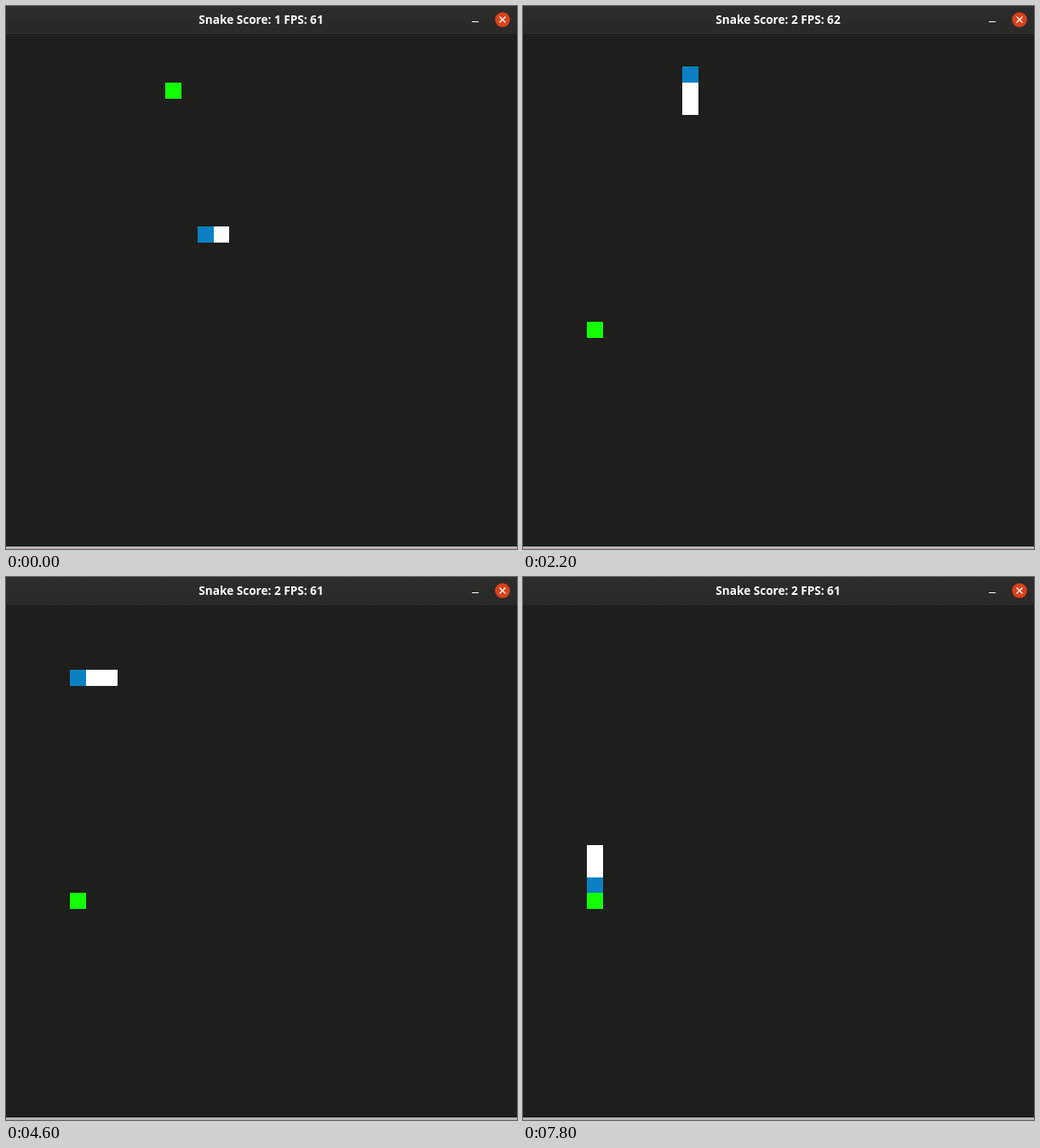
Animation of 600 by 638 pixels, one loop 8000 ms. Source, as an HTML page with a canvas:

```html
<!DOCTYPE html>
<html lang="en">
<head>
<meta charset="utf-8">
<title>Snake</title>
<style>
  html, body { margin: 0; width: 100%; height: 100%; overflow: hidden; background: #1e1e1c; }
  canvas { display: block; width: 600px; height: 638px; }
</style>
</head>
<body>
<canvas id="stage" width="600" height="638"></canvas>
<script>
const ctx = document.getElementById('stage').getContext('2d');

const LOOP = 8000, TICK = 200;
const CELL = 600 / 32, TOP = 34;
const MOVES_PER_MS = 0.006565, MOVE_PHASE = 0.49;
const EAT_MOVE = 13;
const DIRS = { L: [-1, 0], R: [1, 0], U: [0, -1], D: [0, 1] };

// Each pair is a direction and a number of cells.
const ROUTE = 'L1 U7 L2 U1 R1 U2 R4 D2 L11 D6 R2 D1 L3 D2 R2 D5';

function buildTrail() {
  let x = 13, y = 12;
  const trail = [[x, y], [--x, y]];
  for (const leg of ROUTE.split(' ')) {
    const [dx, dy] = DIRS[leg[0]];
    for (let i = 0; i < +leg.slice(1); i++) trail.push([x += dx, y += dy]);
  }
  return trail;
}
const trail = buildTrail();

function drawCell([col, row], color) {
  const snap = v => Math.round(v - 0.01);
  const x = snap(col * CELL), y = snap(TOP + row * CELL);
  ctx.fillStyle = color;
  ctx.fillRect(x, y, snap((col + 1) * CELL) - x, snap(TOP + (row + 1) * CELL) - y);
}

function drawWindow(title) {
  ctx.fillStyle = '#1e1e1c';
  ctx.fillRect(0, 0, 600, 638);

  const bar = ctx.createLinearGradient(0, 0, 0, TOP);
  bar.addColorStop(0, '#2d2d2c');
  bar.addColorStop(1, '#292928');
  ctx.fillStyle = bar;
  ctx.fillRect(0, 0, 600, TOP - 1);
  ctx.fillStyle = '#b9b6b2';
  ctx.fillRect(0, 635, 600, 3);

  ctx.fillStyle = '#fff';
  ctx.font = 'bold 13.6px "Open Sans", "Noto Sans", sans-serif';
  ctx.textAlign = 'center';
  ctx.textBaseline = 'alphabetic';
  ctx.fillText(title, 299.5, 21);
  ctx.fillRect(547, 18, 8, 1);

  ctx.fillStyle = '#d9411b';
  ctx.beginPath();
  ctx.arc(583, 16, 8.8, 0, Math.PI * 2);
  ctx.fill();
  ctx.strokeStyle = '#fff';
  ctx.lineWidth = 1.4;
  ctx.beginPath();
  ctx.moveTo(579.5, 12.5);
  ctx.lineTo(586.5, 19.5);
  ctx.moveTo(586.5, 12.5);
  ctx.lineTo(579.5, 19.5);
  ctx.stroke();
}

function draw(now) {
  const t = Math.floor((now % LOOP) / TICK) * TICK;
  const move = Math.floor(t * MOVES_PER_MS + MOVE_PHASE);
  const eaten = move >= EAT_MOVE;
  const head = move + 1;
  const length = eaten ? 3 : 2;
  const fps = t >= 2000 && t < 2600 ? 62 : 61;

  drawWindow(`Snake Score: ${eaten ? 2 : 1} FPS: ${fps}`);
  drawCell(eaten ? [4, 18] : [10, 3], '#12ff05');
  for (let i = 1; i < length; i++) drawCell(trail[head - i], '#fff');
  drawCell(trail[head], '#0c80c4');
}

const start = performance.now();
function loop() {
  draw(performance.now() - start);
  requestAnimationFrame(loop);
}
loop();
</script>
</body>
</html>
```
